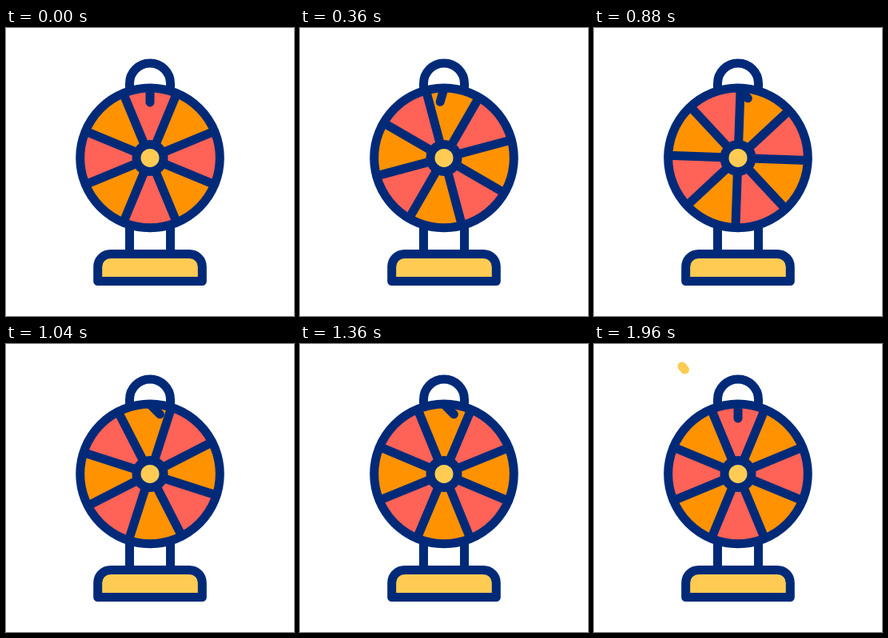
Write an HTML page that moves like this. It is 360 px wide and 360 px high and loops after 2000 ms.

```html
<!DOCTYPE html>
<html>
<head>
<meta charset="utf-8">
<title>Prize wheel</title>
<style>
  html, body { margin: 0; width: 100%; height: 100%; overflow: hidden; background: #fff; }
  svg { display: block; width: 100vw; height: 100vh; }
</style>
</head>
<body>
<svg viewBox="0 0 360 360" fill="none" stroke="#002a78" stroke-width="11" stroke-linecap="round" stroke-linejoin="round">
  <path d="M154.5 74V69.4a25.5 25.5 0 0 1 51 0V74M154.5 245V282M205.5 245V282"/>
  <path d="M114.7 316.5V298.5a16 16 0 0 1 16-16h98.6a16 16 0 0 1 16 16v18z" fill="#ffcb52"/>
  <g transform="translate(180 162.4)">
    <g id="wheel">
      <circle r="87" fill="#ff9200" stroke="none"/>
      <path id="wedges" fill="#ff6257" stroke="none"/>
      <path id="spokes"/>
    </g>
    <circle r="87.3"/>
    <circle r="17" fill="#ffcb52"/>
    <path id="pointer" d="M0 -87V-69.5"/>
  </g>
  <g id="rays" stroke="#ffcb52"></g>
</svg>
<script>
const $ = id => document.getElementById(id);
const LOOP = 2000;

// Point on the wheel, degrees clockwise from the top
const rim = deg => {
  const a = deg * Math.PI / 180;
  return `${87 * Math.sin(a)} ${-87 * Math.cos(a)}`;
};
let wedges = '', spokes = '';
for (let a = 0; a < 360; a += 90) {
  wedges += `M0 0L${rim(a - 22.5)}A87 87 0 0 1 ${rim(a + 22.5)}z`;
}
for (let a = 22.5; a < 180; a += 45) spokes += `M${rim(a)}L${rim(a + 180)}`;
$('wedges').setAttribute('d', wedges);
$('spokes').setAttribute('d', spokes);

const ease = (t, from, to) => {
  const s = Math.min(1, Math.max(0, (t - from) / (to - from)));
  return s * s * (3 - 2 * s);
};

// Value from eased [time, value] keys
const track = (t, keys) => {
  let v = keys[0][1];
  for (let i = 1; i < keys.length; i++) {
    v += (keys[i][1] - keys[i - 1][1]) * ease(t, keys[i - 1][0], keys[i][0]);
  }
  return v;
};

const spin = [[0, 0], [389, -38], [1494, 1080]];
const swing = [[0, 0], [389, 16], [890, -45], [1370, -45], [1500, 0]];

// Start time, inner end, outer end
const rays = [
  [1465, 223.5, 57, 248.5, 26.5],
  [1480, 180, 29, 180, 7],
  [1605, 137, 59.5, 110, 28]
].map(ray => {
  const el = document.createElementNS('http://www.w3.org/2000/svg', 'path');
  $('rays').append(el);
  return [el, ...ray];
});

function draw(t) {
  $('wheel').setAttribute('transform', `rotate(${track(t, spin)})`);
  $('pointer').setAttribute('transform', `rotate(${track(t, swing)} 0 -87)`);
  for (const [el, start, x1, y1, x2, y2] of rays) {
    const head = ease(t, start, start + 195);
    const tail = ease(t, start + 205, start + 400);
    const at = p => `${x1 + (x2 - x1) * p} ${y1 + (y2 - y1) * p}`;
    el.setAttribute('d', head - tail > 0.01 ? `M${at(tail)}L${at(head)}` : '');
  }
}

const begin = performance.now();
function tick() {
  draw((performance.now() - begin) % LOOP);
  requestAnimationFrame(tick);
}
tick();
</script>
</body>
</html>
```
